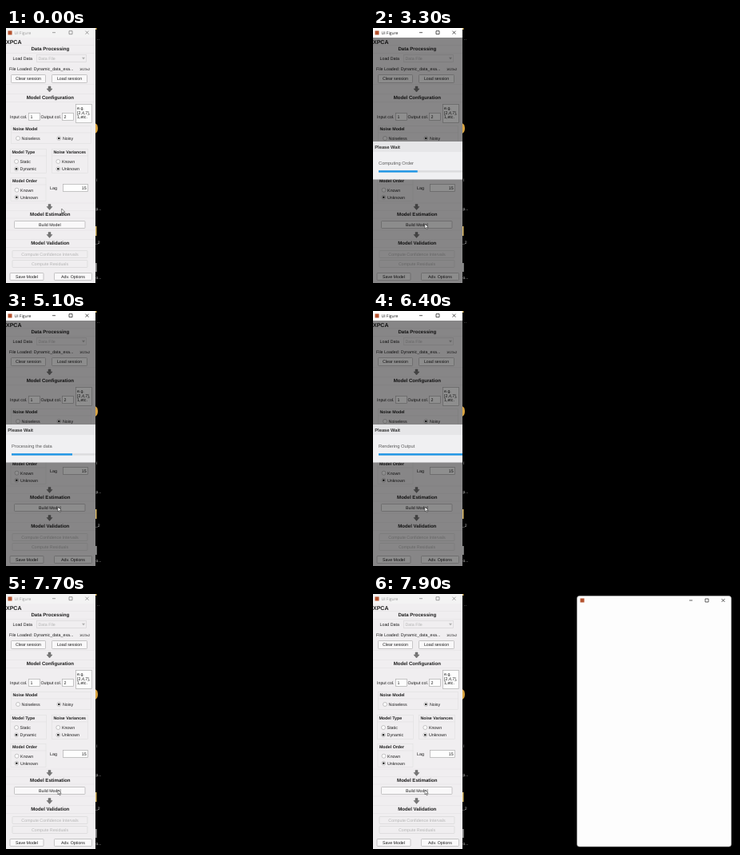
Animation of 452 by 319 pixels, one loop 8 s. Source, as an HTML page:

```html
<!DOCTYPE html>
<html lang="en">
<head>
<meta charset="utf-8">
<title>XPCA</title>
<style>
html, body { margin: 0; width: 100%; height: 100%; overflow: hidden; background: #000; }
svg { display: block; width: 452px; height: 319px; }
text { font: 5.3px "Liberation Sans", Arial, sans-serif; fill: #1c1c1c; text-rendering: geometricPrecision; white-space: pre; }
.b { font-weight: bold; }
.h { font-weight: bold; font-size: 6.1px; text-anchor: middle; }
.app { font-weight: bold; font-size: 7px; }
.mid { text-anchor: middle; }
.end { text-anchor: end; }
.off { fill: #b4b4b4; }
.tiny { font-size: 4px; }
.cap { font: 5px "Open Sans", "Noto Sans", sans-serif; }
.dlg { font-size: 5.74px; fill: #5c5c5c; }
.dlgb { font-size: 5.74px; font-weight: bold; fill: #333; }
.desk { font-size: 5px; fill: #c8c8c8; }
</style>
</head>
<body>
<svg viewBox="0 0 452 319" xmlns="http://www.w3.org/2000/svg">
  <defs><clipPath id="clip"><rect width="112" height="319"/></clipPath></defs>
  <rect width="452" height="319"/>
  <g id="desk"></g>
  <g clip-path="url(#clip)">
    <g id="panel"></g>
    <rect id="dim" y="12" width="112" height="307" fill="#000"/>
    <g id="dialog"></g>
    <g id="title"></g>
  </g>
  <path id="cursor" d="M0 0V7L1.6 5.5 2.7 8 3.8 7.5 2.7 5.1H4.9Z" fill="#fff" stroke="#222" stroke-width=".6"/>
  <g id="figure"></g>
</svg>
<script>
const $ = id => document.getElementById(id);
const NS = 'http://www.w3.org/2000/svg';
let layer;

function add(tag, attrs) {
  const el = document.createElementNS(NS, tag);
  for (const k in attrs) el.setAttribute(k, attrs[k]);
  return layer.appendChild(el);
}
function text(s, x, y, cls = '') {
  const el = add('text', { x, y, class: cls });
  el.textContent = s;
  return el;
}
const rect = (x, y, width, height, fill, more = {}) => add('rect', { x, y, width, height, fill, ...more });
const path = (d, stroke, width = .7) => add('path', { d, stroke, 'stroke-width': width, fill: 'none' });

function button(s, x, y, w, h, off) {
  rect(x + .5, y + .5, w - 1, h - 1, off ? '#f0eef0' : '#f9f8f9',
    { rx: .8, stroke: off ? '#d9d8d9' : '#b2b1b2', 'stroke-width': .7 });
  text(s, x + w / 2, y + h / 2 + 1.9, off ? 'mid off' : 'mid');
}
function field(x, y, w, h) {
  rect(x + .5, y + .5, w - 1, h - 1, '#fdfdfd', { stroke: '#b0afb0', 'stroke-width': .7 });
}
function radio(s, cx, cy, on) {
  add('circle', { cx, cy, r: 2.5, fill: '#fbfbfb', stroke: '#a4a3a4', 'stroke-width': .6 });
  if (on) add('circle', { cx, cy, r: 1.3, fill: '#222' });
  text(s, cx + 4.6, cy + 1.9);
}
function group(s, x, y, w, h) {
  rect(x + .5, y + .5, w - 1, h - 1, 'none', { stroke: '#e0dfe0', 'stroke-width': .6 });
  path(`M${x} ${y + 9}h${w}`, '#e0dfe0', .6);
  text(s, x + 2.4, y + 6.2, 'b');
}
function arrow(x, y) {
  add('path', { d: `M${x - 1.5} ${y - 3.5}h3v3h2l-3.5 4 -3.5 -4h2z`, fill: '#777', stroke: '#555', 'stroke-width': .4 });
}
// Minimise, maximise and close marks centred on xs
function controls(xs, y, color) {
  const [a, b, c] = xs;
  return path(`M${a - 2} ${y}h4M${b - 2} ${y - 2}h4v4h-4zM${c - 2} ${y - 2}l4 4m0 -4l-4 4`, color);
}

layer = $('desk');
[['..', 114, 15], ['l', 113, 192], ['p...', 112.5, 228], ['_2', 112, 270], ['o...', 112.5, 314]]
  .forEach(a => text(...a, 'desk'));
add('path', { d: 'M112 119.5a3 6 0 0 1 0 12z', fill: '#d9a441' });
rect(112, 0, 1.5, 2, '#d9b866');
rect(112, 248, 1.5, 12, '#d9b866');
rect(112, 294, 1.8, 11, '#8a8a8a');

layer = $('panel');
rect(0, 0, 112, 319, '#f0eef0');
text('XPCA', 0, 20, 'app');
[21.5, 31.5, 70.5, 82.5, 92.5, 219, 228.5, 238, 253, 264.5, 274.5]
  .forEach(y => path(`M0 ${y}H112`, '#e4e3e4', .6));
[['Data Processing', 28.2], ['Model Configuration', 89.4], ['Model Estimation', 235.2], ['Model Validation', 271.4]]
  .forEach(([s, y]) => text(s, 55.3, y, 'h'));
[76.5, 224, 259].forEach(y => arrow(54.5, y));

text('Load Data', 8.5, 39.8);
rect(38.5, 33.5, 62, 9, '#f0eef0', { stroke: '#d9d8d9', 'stroke-width': .7 });
text('Data File', 40.5, 39.8, 'off');
add('path', { d: 'M95 36.7h4l-2 2.8z', fill: '#b0b0b0' });
text('File Loaded: Dynamic_data_exa...', 4, 52.8);
text('1623x2', 92, 53.3, 'tiny');
button('Clear session', 6, 58, 44, 11);
button('Load session', 57, 58, 45, 11);

text('Input col.', 5, 112.8);
field(28, 106, 15, 10);
text('1', 30.5, 112.9);
text('Output col.', 43.5, 112.8);
field(70, 106, 15, 10);
text('2', 72.5, 112.9);
field(87, 95, 21, 24);
['e.g.', '[2,4,7],', '1,etc.'].forEach((s, i) => text(s, 89, 102 + i * 5.6));

group('Noise Model', 6, 122, 101, 23);
radio('Noiseless', 15, 138);
radio('Noisy', 66.3, 138, true);
group('Model Type', 5, 151, 46, 31);
radio('Static', 13, 167);
radio('Dynamic', 13, 176.3, true);
group('Noise Variances', 57, 151, 46, 31);
radio('Known', 65.3, 167);
radio('Unknown', 65.3, 176.3, true);
group('Model Order', 5.5, 187, 45, 30);
radio('Known', 13.5, 202.7);
radio('Unknown', 13.3, 211.8, true);
text('Lag', 55, 202);
field(71, 195, 32, 10);
text('15', 100.7, 201.9, 'end');

button('Build Model', 10, 241, 89.5, 10);
button('Compute Confidence Intervals', 7.5, 278, 95, 10, true);
button('Compute Residuals', 7.5, 290, 95, 10, true);
button('Save Model', 4.5, 306, 43, 10);
button('Adv. Options', 60, 306, 48, 10);

layer = $('title');
const bar = rect(0, 0, 112, 12, '#f3f3f3');
rect(2.5, 3.5, 5, 5, '#b5532f');
const caption = text('UI Figure', 10.5, 7.8, 'cap');
const marks = controls([60, 81, 101.5], 5.7, '#333');

layer = $('dialog');
rect(0, 142, 112, 47.5, '#f0f0f2');
rect(0, 142, 112, 13, '#e6e6e8');
text('Please Wait', 2.3, 150.8, 'dlgb');
const message = text('', 7, 170.8, 'dlg');
rect(7, 178.2, 105, 2.4, '#dcdcde');
const progress = rect(7, 178.2, 0, 2.4, '#1c95e6');

layer = $('figure');
rect(255.5, 2.5, 193, 313.5, '#fdfdfd', { rx: 3, stroke: '#b8b8b8', 'stroke-width': .6 });
rect(259.5, 5.5, 5, 5, '#b5532f');
controls([398, 418, 438.5], 8, '#222');

// Piecewise interpolation through [time, value] stops
function track(stops, t, ease = u => u) {
  let [t0, v0] = stops[0];
  for (const [t1, v1] of stops) {
    if (t < t1) return v0 + (v1 - v0) * ease((t - t0) / (t1 - t0));
    [t0, v0] = [t1, v1];
  }
  return v0;
}
const smooth = u => u * u * (3 - 2 * u);
const easeOut = u => 1 - (1 - u) ** 2;
const CURSOR_X = [[0, 69.7], [700, 65]];
const CURSOR_Y = [[0, 226], [700, 245]];
const BAR_END = [[0, 7], [3000, 7], [3400, 59], [5000, 59], [5100, 83], [5300, 85], [5900, 85], [6400, 112]];
const DIM = [[0, 0], [2900, 0], [3100, .44], [7400, .44], [7600, 0]];
const OPEN = [[0, 0], [7700, 0], [7900, 1]];
const show = (el, on) => el.setAttribute('visibility', on ? 'visible' : 'hidden');

function draw(t) {
  const active = t >= 3000 && t < 7600;
  bar.setAttribute('fill', active ? '#fff' : '#f3f3f3');
  caption.style.fill = active ? '#111' : '#999';
  marks.setAttribute('stroke', active ? '#111' : '#777');

  $('dim').setAttribute('opacity', track(DIM, t));
  show($('dialog'), t >= 3100 && t < 7500);
  message.textContent = t < 5100 ? 'Computing Order' : t < 6000 ? 'Processing the data' : 'Rendering Output';
  progress.setAttribute('width', track(BAR_END, t, easeOut) - 7);

  const x = track(CURSOR_X, t, smooth), y = track(CURSOR_Y, t, smooth);
  $('cursor').setAttribute('transform', `translate(${x} ${y}) scale(.85)`);

  const open = track(OPEN, t), s = .92 + .08 * open;
  show($('figure'), open > 0);
  $('figure').setAttribute('opacity', open);
  $('figure').setAttribute('transform', `translate(352 159) scale(${s}) translate(-352 -159)`);
}

const start = performance.now();
function tick() {
  const t = (performance.now() - start) % 8000;
  draw(Math.floor(t / 100) * 100);
  requestAnimationFrame(tick);
}
tick();
</script>
</body>
</html>
```
